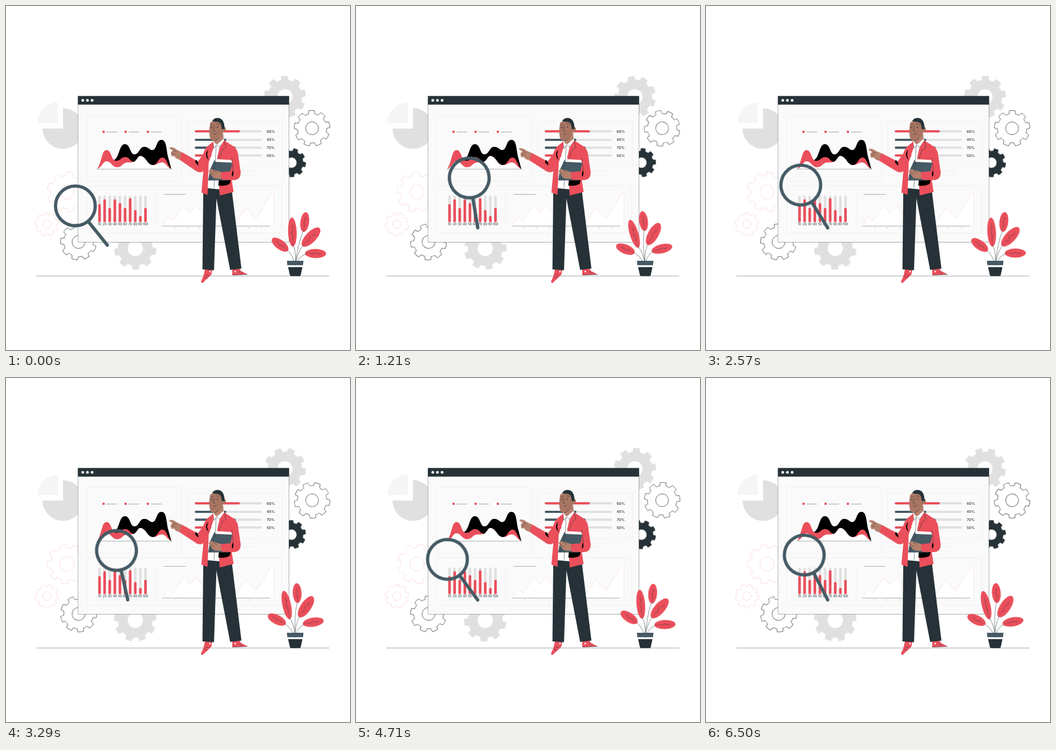
Animation of 640x640 px, one loop 6570 ms. Source, as an HTML page without scripts:

```html
<!DOCTYPE html>
<html lang="en">
<head>
<meta charset="utf-8">
<title>Data report</title>
<style>
html, body { margin: 0; width: 100%; height: 100%; overflow: hidden; background: #fff; }
svg { display: block; width: 100vw; height: 100vh; }
text { font-family: Inter, "Open Sans", sans-serif; fill: #263238; }

.swing, .lens, .arm, .slide { animation: swing 6.57s linear infinite; }
.swing { --a: 30deg; }
.plant { --a: -15deg; transform-origin: 538px 482px; }
.lens { --a: 31deg; animation-name: lens; transform-origin: 227px 413px; }
.arm { --a: -4.5deg; animation-name: arm; transform-origin: 360px 298px; }
.slide { animation-name: slide; }

/* even back-and-forth turns, cut off by the loop */
@keyframes swing {
  0%, 37.6%, 75.19% { transform: rotate(0deg); }
  18.8%, 56.39%, 93.99% { transform: rotate(var(--a)); }
  100% { transform: rotate(calc(var(--a) * .68)); }
}
@keyframes lens {
  0%, 35.16%, 70.32% { transform: rotate(0deg); }
  17.58%, 52.74%, 87.9% { transform: rotate(var(--a)); }
  100% { transform: rotate(calc(var(--a) * .312)); }
}
@keyframes arm {
  0%, 23.52%, 47.03%, 70.55%, 94.06% { transform: rotate(0deg); }
  11.76%, 35.27%, 58.79%, 82.31% { transform: rotate(var(--a)); }
  100% { transform: rotate(calc(var(--a) * .505)); }
}
@keyframes slide {
  0% { transform: translate(-38px, 32px); }
  10.5%, 100% { transform: none; }
}

.red { fill: #ea4f5b; }
.dark { fill: #263238; }
.slate { fill: #455a64; }
.skin { fill: #b5806c; }
.face { fill: #a87562; }
.white { fill: #fff; }
.line { fill: none; stroke: #263238; stroke-width: .6; stroke-linecap: round; }
.vein { stroke-width: .5; stroke-opacity: .65; }
.panel { fill: none; stroke: #e9e9e9; stroke-width: .6; }
.bar { fill: none; stroke-width: 4.2; stroke-linecap: round; }
</style>
</head>
<body>
<svg viewBox="0 0 640 640">
<defs>
  <path id="tooth" vector-effect="non-scaling-stroke" stroke-linejoin="round"
    d="M-28-77.100A82 82 0 0 1-17.700-80.100L-16-98.700A100 100 0 0 1 16-98.700L17.700-80.100A82 82 0 0 1 28-77.100"/>
  <g id="third"><use href="#tooth"/><use href="#tooth" transform="rotate(40)"/><use href="#tooth" transform="rotate(80)"/></g>
  <g id="gear">
    <circle r="81" stroke="none"/>
    <use href="#third"/><use href="#third" transform="rotate(120)"/><use href="#third" transform="rotate(240)"/>
    <circle r="36" fill="#fff" vector-effect="non-scaling-stroke"/>
  </g>
  <g id="leaf">
    <ellipse rx="8" ry="20" class="red"/>
    <path class="line vein" vector-effect="non-scaling-stroke" d="M0 20V-11M0-3L3-8M0 4L-3-1M0 10L3 5"/>
  </g>
</defs>

<!-- pie and gears behind the window -->
<path fill="#f5f5f5" d="M96.500 218V179.500A38.500 38.500 0 0 0 58.500 218Z"/>
<path fill="#e0e0e0" d="M106 228V190A38 38 0 1 1 68 228Z"/>
<g fill="#e0e0e0">
  <g transform="translate(519 169)scale(.39)rotate(-1)"><use href="#gear" class="swing"/></g>
  <g transform="translate(240.500 451)scale(.395)rotate(19)"><use href="#gear" class="swing"/></g>
</g>
<g class="dark" transform="translate(531 291.500)scale(.27)rotate(18)"><use href="#gear" class="swing"/></g>
<g fill="#fff" stroke="#263238" stroke-width=".8">
  <g transform="translate(569.500 227.500)scale(.332)rotate(-2)"><use href="#gear" class="swing"/></g>
  <g transform="translate(135 439)scale(.335)rotate(-7)"><use href="#gear" class="swing"/></g>
</g>
<g fill="#fff" stroke="#f5b5ba" stroke-width=".5">
  <g transform="translate(113.500 346)scale(.37)rotate(7)"><use href="#gear" class="swing"/></g>
  <g transform="translate(76 406)scale(.22)rotate(-4)"><use href="#gear" class="swing"/></g>
</g>

<path class="line" stroke-opacity=".75" d="M57 502.300H601"/>

<!-- window -->
<rect x="134" y="168" width="392.300" height="271.500" fill="#fafafa" stroke="#263238" stroke-width=".4"/>
<rect class="dark" x="133.800" y="167.500" width="392.800" height="16"/>
<g class="white"><circle cx="142.800" cy="175.400" r="2.500"/><circle cx="151.500" cy="175.400" r="2.500"/><circle cx="160.200" cy="175.400" r="2.500"/></g>
<path class="panel" d="M150.500 203.500H326.500V326H150.500ZM338 214H514V298H338ZM150.500 334.500H513V422.500H150.500ZM279.500 347V411M338 307H465M338 314.500H463"/>

<!-- area chart -->
<path class="red" d="M179.500 232h4v4h-4zM220.500 232h4v4h-4zM262 232h4v4h-4z"/>
<path class="line" stroke-opacity=".8" d="M187.500 234.500H206M228.500 234.500H247M270 234.500H289"/>
<path d="M172 303C185 300 195 289 200 287C211 284 210 257 221 257C232 257 230 276 239 276C248 276 248 262 257 262C266 262 266 268 272 268C281 268 279 249 289 249C298 249 298 262 301 279L307.500 303Z"/>
<path class="red" d="M170 303C179 288 178 268 187 268C197 268 195 288 205 288C213 288 214 281 222 281C230 281 231 290 238 290C244 287 245 279 250 279C261 280 263 296 273 296C282 296 283 282 291 282C299 282 300 296 307 303Z"/>
<path class="white" d="M170 303C179 300 180 289 187 289C196 289 197 300 207 300C216 300 217 291 226 291C233 291 233 291 238 290C244 287 245 279 250 279C261 280 263 296 273 296C282 296 283 291 290 291C298 291 299 300 307 303Z"/>
<path class="line" stroke-opacity=".7" d="M169 303.400H308"/>

<!-- percent bars -->
<path class="bar" stroke="#e0e0e0" d="M353.300 233.200H474M353.300 249H474M353.300 263.700H474M353.300 278.200H474"/>
<path class="bar" stroke="#ea4f5b" d="M353.300 233.200H433M353.300 278.200H413"/>
<path class="bar" stroke="#455a64" d="M353.300 249H408M353.300 263.700H425"/>
<g font-size="6.800" font-weight="500">
  <text x="485" y="235.600">60%</text><text x="485" y="251.400">45%</text>
  <text x="485" y="266.200">70%</text><text x="485" y="280.700">50%</text>
</g>

<!-- column chart -->
<g class="bar" style="stroke-width:4.800px">
  <path stroke="#e0e0e0" d="M174 400V355M183.500 400V355M193 400V355M202.500 400V355M212 400V355M221.500 400V355M231 400V355M240.500 400V355M250 400V355M259.500 400V355"/>
  <path stroke="#ea4f5b" d="M174 400V371M183.500 400V362M193 400V378M202.500 400V362M212 400V369M221.500 400V378M231 400V360M240.500 400V382M250 400V393M259.500 400V378"/>
</g>
<g font-size="5.900" text-anchor="middle">
  <text x="174" y="408.300">10</text><text x="183.500" y="408.300">20</text><text x="193" y="408.300">30</text>
  <text x="202.500" y="408.300">40</text><text x="212" y="408.300">50</text><text x="221.500" y="408.300">60</text>
  <text x="231" y="408.300">70</text><text x="240.500" y="408.300">80</text><text x="249.500" y="408.300">90</text>
  <text x="259.500" y="408.300">100</text>
</g>

<!-- line chart -->
<path class="white" stroke="#f5b5ba" stroke-width=".4" d="M291 409L299 395Q303 391 307 397Q310 402 314 396L329 373Q331 369 334 374L339 382Q341 386 344 382L352 373Q354 369 357 374L366 386L400 398L427 404L444 379Q447 375 450 379L461 393Q464 397 467 393L495 348Q498 344 498.500 349V409"/>
<path class="line" stroke-opacity=".7" d="M294 350.500H334M291 409.400H491M314 412.500v1M337 412.500v1M360 412.500v1M429 412.500v1M452 412.500v1M475 412.500v1"/>

<!-- plant -->
<g class="swing plant">
  <path class="line" d="M538 484Q534 462 522 453M538 484Q541 460 534 444M538 484Q542 445 553 418M538 484Q540 462 553 445M538 484Q543 465 560 461"/>
  <use href="#leaf" transform="translate(510 444)rotate(-53)scale(1.100 .92)"/>
  <use href="#leaf" transform="translate(532.800 420.500)rotate(-2)scale(1 1.350)"/>
  <use href="#leaf" transform="translate(555.800 402)rotate(7)scale(1.030 .92)"/>
  <use href="#leaf" transform="translate(567.500 430)rotate(44)scale(1.230 1.150)"/>
  <use href="#leaf" transform="translate(576 460.500)rotate(91)scale(1.050 .98)"/>
</g>
<path class="slate" d="M522.500 474H553.500L552.500 482.500H523.500Z"/>
<path class="white" d="M524 482.500H552L551.500 486H524.500Z"/>
<path class="dark" d="M524.800 485.800H551.500L548.500 500Q548 502.500 546 502.500H530.500Q528.500 502.500 528 500Z"/>

<!-- legs and shoes -->
<path class="red" d="M370 490H384L382 500L366 515Q363 516 363 512Q368 503 370 490ZM421 490L434 488L437 493L450 499.500L421 501Z"/>
<g class="white"><circle cx="379.500" cy="494" r="1.500"/><circle cx="426.500" cy="494" r="1.500"/></g>
<path class="line" d="M371 500L377 502M369 504L374 506M433 496L436 493M437 498L440 495M422 500.300L449 499.500"/>
<path class="dark" d="M367 344L365.500 490L387 491.500L391.500 358L417 491L438 488.500L420 342L396 338H376Z"/>

<!-- shirt -->
<path class="white" d="M385 253L405 249L408 300L397 341L375 339Z"/>
<path class="skin" d="M387 244L404 236L405 250Q397 258 390 257Q386 255 387 244Z"/>
<path class="white" d="M385 251L392 258L386 266ZM405 247L407 252L397 263L392 258Z"/>
<path class="line" d="M385 252L387 265L392 258L397 263L406 251M391 260L387 338"/>

<!-- pointing arm -->
<g class="arm">
  <path class="skin" d="M305 263Q311 262 317 267L329 273L323 286Q315 284 313 279Q307 282 307 274Q307 270 311 269L305 265.500Q304 264 305 263Z"/>
  <path class="line" d="M311 269L317 271M309 274L314 275"/>
  <path class="red" d="M327.500 272L357 289L368 275L371 301Q366 313 355 308L323 286Z"/>
  <path d="M353 286Q358 288 358 297L352 291Z"/>
</g>

<!-- jacket -->
<path class="red" d="M386 252L376 260Q368 266 365.500 282L367 310L363.500 347L375 351.500L377 292L386 264Z"/>
<path d="M376 268Q370 274 373 281L377 287L374 277Z"/>
<path class="red" d="M406 250L420 259Q431 264 432 278L436.500 309Q437 322 426 323.500L420 324L423.500 346L397.500 352.500L395 310L393 281L397 264Z"/>
<path d="M396 324H418L416 331Q406 336 395 334Z"/>
<path class="line" d="M406 251L409 263L402 268L396 285M420 283L423 307"/>

<!-- book and holding arm -->
<path class="white" d="M386 290L394 285L419 286.500L421 292Z"/>
<path class="slate" d="M388 286L390 290L421 291.500L414 324.500H376L380 303Z"/>
<path class="line" d="M390 290L380 324"/>
<path class="skin" d="M377 307Q381 301 387 305L401 309V321Q389 323 384 318Z"/>
<path class="line" d="M380 309L387 314M386 306L392 310"/>
<path class="red" d="M400.500 309L421 307L436 305Q438 322 426 323.500H402Q399 316 400.500 309Z"/>
<path d="M422 306Q425 312 421 318Q419 312 422 306Z"/>

<!-- head -->
<path class="face" d="M380 217Q377 231 379 243Q381 252 389 251Q400 247 403 235Q410 234 409 228Q408 223 403 226L401 214Q388 211 380 217Z"/>
<path class="dark" d="M383.500 214Q387 207.500 396 208.500Q407 211 406.500 229L401.500 229Q401 224 399.500 219Q395 214 389 215.500Z"/>
<path class="line" d="M381 221.500L385 220.500M391.500 219.500L397 220"/>
<path class="line" d="M387.500 223L385.500 232.500L389 233M386 238.500Q389 239 392 236.500M388 251Q393 249 396 246"/>
<g class="dark"><circle cx="382.800" cy="226" r="1"/><circle cx="393.500" cy="225.500" r="1"/></g>

<!-- magnifier -->
<g class="slide">
  <g class="lens" fill="none" stroke="#455a64" stroke-width="6" stroke-linecap="round">
    <circle cx="167" cy="340" r="37"/>
    <path d="M191 369L226.500 413"/>
  </g>
</g>
</svg>
</body>
</html>
```
